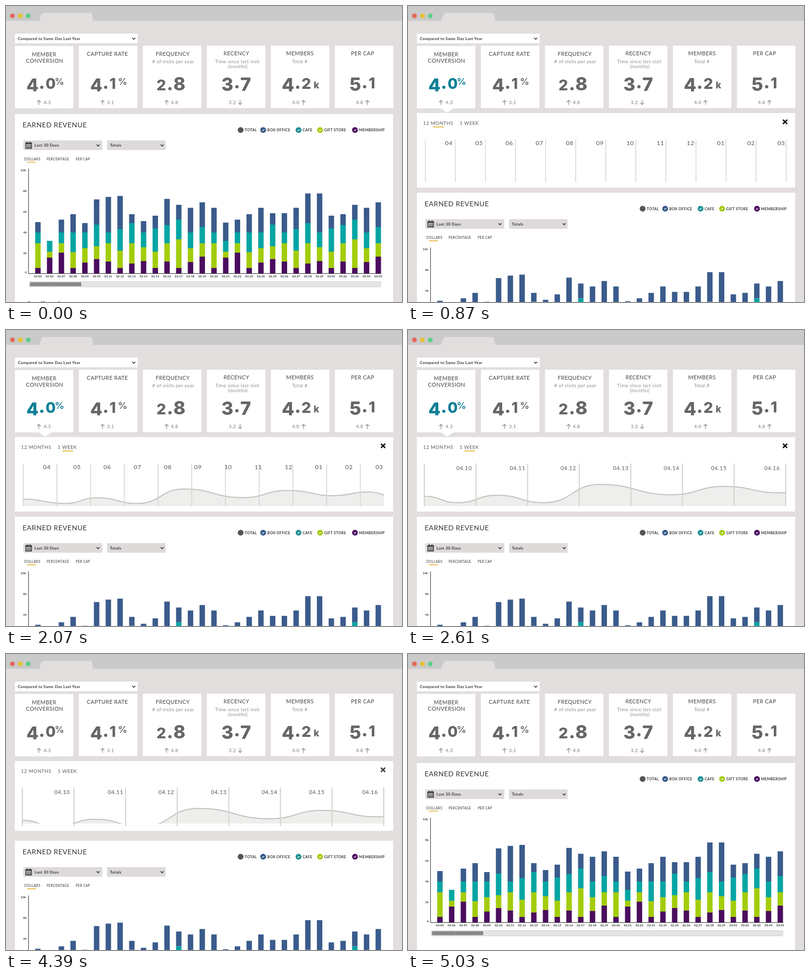
An HTML page for the animation above (5.51 s loop, 800 px wide and 600 px high).

```html
<!DOCTYPE html>
<html lang="en">
<head>
<meta charset="utf-8">
<title>Dashboard</title>
<style>
  html, body { margin: 0; width: 100%; height: 100%; overflow: hidden; background: #e2dedd; }
  svg { display: block; width: 100vw; height: 100vh; }
  text { font-family: Lato, "Open Sans", sans-serif; }
  .num { font-family: Inter, Roboto, sans-serif; font-weight: 800; }
</style>
</head>
<body>
<svg id="stage" viewBox="0 0 800 600"></svg>
<script>
const LOOP = 5510;
const TEAL = [12, 127, 150], GREY = [102, 102, 102], YELLOW = '#e3b437';
const stage = document.getElementById('stage');

// Drawing helpers
function add(parent, tag, attrs = {}, str) {
  const el = document.createElementNS('http://www.w3.org/2000/svg', tag);
  set(el, attrs);
  if (str !== undefined) el.textContent = str;
  parent.appendChild(el);
  return el;
}
function set(el, attrs) {
  for (const k in attrs) el.setAttribute(k, attrs[k]);
}
const group = (parent, attrs) => add(parent, 'g', attrs);
const rect = (parent, x, y, width, height, fill, more) =>
  add(parent, 'rect', { x, y, width, height, fill, ...more });
const stroke = (parent, d, color, width, more) =>
  add(parent, 'path', { d, fill: 'none', stroke: color, 'stroke-width': width, ...more });
const label = (parent, x, y, str, size, fill, weight = 400, spacing = 0.4, anchor = 'start') =>
  add(parent, 'text', {
    x, y, fill, 'font-size': size, 'font-weight': weight,
    'letter-spacing': spacing, 'text-anchor': anchor
  }, str);
const chevron = (parent, x, y) =>
  stroke(parent, `M${x - 3} ${y - 1.5}l3 3l3 -3`, '#222', 1.5);

// Old-style figures: 0 1 2 are short, 3 4 5 7 9 hang below the line
function figures(parent, x, y, str, size) {
  const el = add(parent, 'text', { x, y, class: 'num', 'letter-spacing': 1.4 });
  let low = 0;
  for (const ch of str) {
    const drop = '34579'.includes(ch) ? size * 0.14 : 0;
    add(el, 'tspan', { 'font-size': '012'.includes(ch) ? size * 0.82 : size, dy: drop - low }, ch);
    low = drop;
  }
}
function unit(parent, x, y, str, size, weight) {
  add(parent, 'text', { x, y, class: 'num', 'font-size': size, style: `font-weight:${weight}` }, str);
}

// Browser frame
rect(stage, 0, 0, 800, 600, '#e2dedd');
rect(stage, 0, 0, 800, 30, '#cacaca');
add(stage, 'path', { d: 'M67 30.5L71.500 17.500Q73 14 77 14H169Q173 14 174 17.500L176.500 30.500Z', fill: '#e2dedd' });
['#e2685d', '#e7c233', '#5ccf88'].forEach((fill, i) =>
  add(stage, 'circle', { cx: 13 + 16 * i, cy: 20, r: 4.8, fill }));
rect(stage, 18, 56, 248, 19.5, '#fff');
label(stage, 24, 68.5, 'Compared to Same Day Last Year', 8, '#333', 700, 0.3);
chevron(stage, 258, 66);

// Layers, back to front
const defs = add(stage, 'defs');
const clipRect = id => rect(add(defs, 'clipPath', { id }), 0, 0, 0, 0, '#000');
const panelClip = clipRect('panelClip'), curveClip = clipRect('curveClip');
const panel = group(stage);
const revenue = group(stage);
const cards = group(stage);

// Metric cards
function card(i, title, sub, subX, delta, arrowX, deltaX, down) {
  const x = 18 + 129.3 * i;
  rect(cards, x, i ? 80.5 : 81, 118, 126.5, '#fff');
  title.forEach(([str, cx, y]) => label(cards, cx, y, str, 11, '#444', 400, 0.4, 'middle'));
  sub.forEach((str, n) => label(cards, subX + n, 116 + 10 * n, str, 9.5, '#8a8a8a', 400, 0.45, 'middle'));
  label(cards, deltaX, 199, delta, 9.5, '#999', 700, 0.5);
  const s = down ? -1 : 1;
  stroke(cards, `M${arrowX} ${195.5 + 5 * s}v${-9.5 * s}m-3.8 ${4 * s}l3.8 ${-4 * s}l3.800 ${4 * s}`, '#999', 1.5);
}
card(0, [['MEMBER', 77, 101.5], ['CONVERSION', 78, 114.5]], [], 0, '4.3', 66.5, 76);
card(1, [['CAPTURE RATE', 205, 100.5]], [], 0, '3.1', 195, 204);
card(2, [['FREQUENCY', 337, 100.5]], ['# of visits per year'], 338, '4.8', 324.5, 333);
card(3, [['RECENCY', 465.5, 100]], ['Time since last visit', '(months)'], 467.5, '3.2', 473, 450, true);
card(4, [['MEMBERS', 594, 100]], ['Total #'], 593.5, '4.0', 601, 578);
card(5, [['PER CAP', 720.5, 99.5]], [], 0, '4.8', 730, 707);

const hero = group(cards);
figures(hero, 41, 168, '4.0', 36);
unit(hero, 98.5, 159.5, '%', 19, 600);
const others = group(cards, { fill: '#666' });
figures(others, 170, 168, '4.1', 36);
unit(others, 226, 159.5, '%', 19, 600);
figures(others, 304, 171, '2.8', 37);
figures(others, 435, 167, '3.7', 37);
figures(others, 557, 168, '4.2', 37);
unit(others, 621.5, 167, 'k', 19, 800);
figures(others, 694, 167, '5.1', 37);

const pointer = add(cards, 'path', { d: 'M65.500 207H92.500L79 216.500Z', fill: '#fff' });

// Detail panel
const sheet = rect(panel, 18, 0, 764, 0, '#fff');
const detail = group(panel, { 'clip-path': 'url(#panelClip)' });
const tabs = group(detail);
label(tabs, 30.5, 240.5, '12 MONTHS', 9.5, '#555', 400, 0.65);
label(tabs, 104.5, 240.5, '1 WEEK', 9.5, '#555', 400, 0.65);
const markMonths = rect(detail, 50.5, 244.3, 22.500, 1.800, YELLOW);
const markWeek = rect(detail, 114, 244.3, 22, 1.8, YELLOW);
const cross = stroke(detail, 'M757.500 230.500l8.500 8.500m0 -8.500l-8.500 8.500', '#111', 2.8);

const curve = group(detail, { 'clip-path': 'url(#curveClip)' });
const area = add(curve, 'path', { fill: '#eeeeed' });
const edge = stroke(curve, '', '#c3bfbc', 2);
const grid = group(detail, { stroke: '#d6d1ce' });
const lines = Array.from({ length: 13 }, () => add(grid, 'line', { y1: 270.500 }));

const two = n => String(n).padStart(2, '0');
const months = group(detail), days = group(detail);
for (let i = 0; i < 12; i++)
  label(months, 82.5 + 61.05 * i, 282, two((i + 3) % 12 + 1), 12.3, '#555', 400, 0.5, 'middle');
[113.5, 221.5, 324, 430, 532.5, 628, 735.5].forEach((x, i) =>
  label(days, x, 283.5, '04.' + (10 + i), 11, '#555', 400, 0.65, 'middle'));

const hover = group(detail);
rect(hover, 554, 269.500, 105, 88, '#696969', { opacity: 0.52 });
const hoverNum = group(hover, { fill: `rgb(${TEAL})` });
figures(hoverNum, 577, 326.5, '3.2', 29);
unit(hoverNum, 628, 314, '%', 15.500, 600);

// Revenue section
rect(revenue, 18, 219, 764, 700, '#fff');
label(revenue, 33.5, 246, 'EARNED REVENUE', 14, '#333', 400, 0.52);
[['TOTAL', 474, '#555'], ['BOX OFFICE', 519.5, '#37598a'], ['CAFE', 591, '#1f8f93'],
 ['GIFT STORE', 634.5, '#a3cc0a'], ['MEMBERSHIP', 705, '#4b0d5f']].forEach(([name, x, fill], i) => {
  add(revenue, 'circle', { cx: x, cy: 251.3, r: 5.9, fill });
  if (i) stroke(revenue, `M${x - 2.2} 251.300l1.700 1.700l2.900 -3.200`, '#fff', 1.2);
  label(revenue, x + 8.3, 254, name, 7.3, '#333', 700, 0.4);
});
rect(revenue, 35, 272.500, 159.500, 19.500, '#dedada');
rect(revenue, 204, 272.500, 118.500, 19.500, '#dedada');
chevron(revenue, 186, 282.5);
chevron(revenue, 315.5, 282.5);
label(revenue, 57.5, 285.3, 'Last 30 Days', 8, '#333', 700, 0.35);
label(revenue, 210, 285.3, 'Totals', 8, '#333', 700, 0.35);
stroke(revenue, 'M40 277.500h11.500v11h-11.500zM40 279.500h11.500M43 275v3M48.500 275v3', '#222', 1.4);
stroke(revenue, 'M42 282.800h8M42 286h8', '#222', 1.8, { 'stroke-dasharray': '2 1' });
label(revenue, 37, 312.6, 'DOLLARS', 6.7, '#333', 400, 0.4);
label(revenue, 82, 312.6, 'PERCENTAGE', 6.7, '#333', 400, 0.35);
label(revenue, 141, 312.6, 'PER CAP', 6.7, '#333', 400, 0.3);
rect(revenue, 42.500, 315.600, 18, 1.700, YELLOW);

['10k', '8k', '6k', '4k', '2k', '0'].forEach((str, i) =>
  label(revenue, i ? 42 : 40.500, (i === 5 ? 541.5 : 335.3 + 42 * i), str, 6.2, '#333', 700, 0.2, 'end'));

// Tops of the lower three layers repeat every 15 days
const LAYERS = [
  [531, 481, 459], [510, 498, 476], [500, 481, 459], [531, 499, 459], [520, 491, 459],
  [513, 487, 443], [518, 481, 459], [531, 496, 452], [522, 481, 440], [517, 489, 459],
  [531, 498, 451], [518, 481, 444], [531, 473, 433], [519, 491, 459], [508, 481, 448]];
const TOPS = [438, 476, 433, 422, 440, 392, 387, 385, 422, 436, 425, 391, 403, 409, 398,
  409, 439, 433, 422, 409, 420, 420, 409, 380, 380, 425, 422, 403, 409, 398];
const COLORS = ['#4b0d5f', '#a3cc0a', '#03a5a3', '#3a5b8c'];
TOPS.forEach((top, i) => {
  const x = 64.5 + 23.71 * i;
  let base = 542;
  [...LAYERS[i % 15], top].forEach((y, n) => {
    rect(revenue, x - 5.5, y, 11, base - y, COLORS[n]);
    base = y;
  });
  const date = i < 25 ? '02.' + two(5 + i) : '03.' + two(i - 24);
  label(revenue, x, 549.5, date, 5.9, '#222', 700, 0.15, 'middle');
});
stroke(revenue, 'M45.500 330V542.300H758', '#444', 1.2);
rect(revenue, 47, 558.500, 710.500, 11, '#e6e3e3', { rx: 2, stroke: '#cfcccc', 'stroke-width': 0.8 });
rect(revenue, 48.5, 560, 103.500, 8, '#8a8787', { rx: 1.500 });
stroke(revenue, 'M97 562.500l-2 1.500l2 1.500', '#bbb', 0.8);
stroke(revenue, 'M45 599.500h3M71 599.500h2M75 599.500h3M106 599.500h2', '#333', 1.4);

// Motion
const sine = u => (1 - Math.cos(Math.PI * u)) / 2;
const fall = u => u ** 2.5;
function at(t, keys, ease = sine) {
  if (t <= keys[0][0]) return keys[0][1];
  for (let i = 1; i < keys.length; i++) {
    const [t0, v0] = keys[i - 1], [t1, v1, own = ease] = keys[i];
    if (t < t1) return v0 + (v1 - v0) * own((t - t0) / (t1 - t0));
  }
  return keys[keys.length - 1][1];
}

const SHIFT = [[220, 0], [570, 159.5], [4450, 159.5], [5030, 2]];
const BOTTOM = [[220, 219], [570, 368], [4310, 368], [4550, 219, fall]];
const TINT = [[30, 0], [210, 1], [3900, 1], [4250, 0]];
const FADES = [
  [sheet, [[190, 0], [270, 1], [4540, 1], [4550, 0]]],
  [detail, [[4540, 1], [4550, 0]]],
  [pointer, [[190, 0], [300, 1], [4150, 1], [4310, 0]]],
  [tabs, [[580, 0], [720, 1]]],
  [cross, [[580, 0], [720, 1], [3700, 1], [3960, 0.8]]],
  [markMonths, [[660, 0], [800, 1], [1740, 1], [1860, 0]]],
  [markWeek, [[1740, 0], [1860, 1], [3060, 1], [3400, 0]]],
  [grid, [[660, 0], [840, 1]]],
  [months, [[690, 0], [860, 1], [2130, 1], [2340, 0]]],
  [days, [[2400, 0], [2640, 1]]],
  [curve, [[900, 0], [1050, 1]]],
  [hover, [[2910, 0], [3090, 1], [3480, 1], [3720, 0]]]];

const YEAR = [[34, 344], [124, 352], [184, 341], [264, 352], [354, 324],
  [467, 341], [556, 327], [645, 337], [707, 330], [764, 343]];
const WEEK = [[33, 337], [100, 350], [180, 335], [275, 350], [388, 313],
  [533, 334], [638, 317], [752, 330], [840, 320], [980, 335]];

function drawCurve(zoom, rise) {
  const pts = YEAR.map(([x, y], i) => [
    x + (WEEK[i][0] - x) * zoom,
    357 - (357 - y - (WEEK[i][1] - y) * zoom) * rise]);
  let d = `M${pts[0]}`;
  for (let i = 1; i < pts.length; i++) {
    const [x0, y0] = pts[i - 1], [x1, y1] = pts[i], mid = (x0 + x1) / 2;
    d += `C${mid} ${y0} ${mid} ${y1} ${x1} ${y1}`;
  }
  set(edge, { d });
  set(area, { d: `${d}V357H${pts[0][0]}Z` });
}

function render(t) {
  const top = at(t, [[220, 212], [570, 217]]);
  const bottom = at(t, BOTTOM), cut = 368 - bottom;
  const height = Math.max(0, bottom - top);
  const zoom = at(t, [[1900, 0], [2530, 1]]);
  const tint = at(t, TINT);

  set(revenue, { transform: `translate(0 ${at(t, SHIFT)})` });
  set(sheet, { y: top, height });
  set(panelClip, { x: 18, y: top, width: 764, height });
  set(curveClip, { x: 33, y: 260, width: 731, height: Math.max(0, 97.5 - 1.45 * cut) });
  set(hero, { fill: `rgb(${GREY.map((g, i) => Math.round(g + (TEAL[i] - g) * tint))})` });
  for (const [el, keys] of FADES) set(el, { opacity: at(t, keys) });

  const gap = 60.75 + 43.55 * zoom;
  lines.forEach((line, i) => {
    const x = 35 - 2 * zoom + gap * i;
    set(line, {
      x1: x, x2: x, y2: Math.max(270.5, 357 - 0.85 * cut),
      'stroke-width': 1.4 + 0.7 * zoom, visibility: x > 766 ? 'hidden' : 'visible'
    });
  });
  drawCurve(zoom, at(t, [[900, 0], [1650, 1]]));
}

// Steps of 30 ms, then 80 ms once the panel closes
const step = t => t < 4070 ? t - t % 30 : t - (t - 4070) % 80;
const start = performance.now();
function tick() {
  render(step((performance.now() - start) % LOOP));
  requestAnimationFrame(tick);
}
tick();
</script>
</body>
</html>
```
